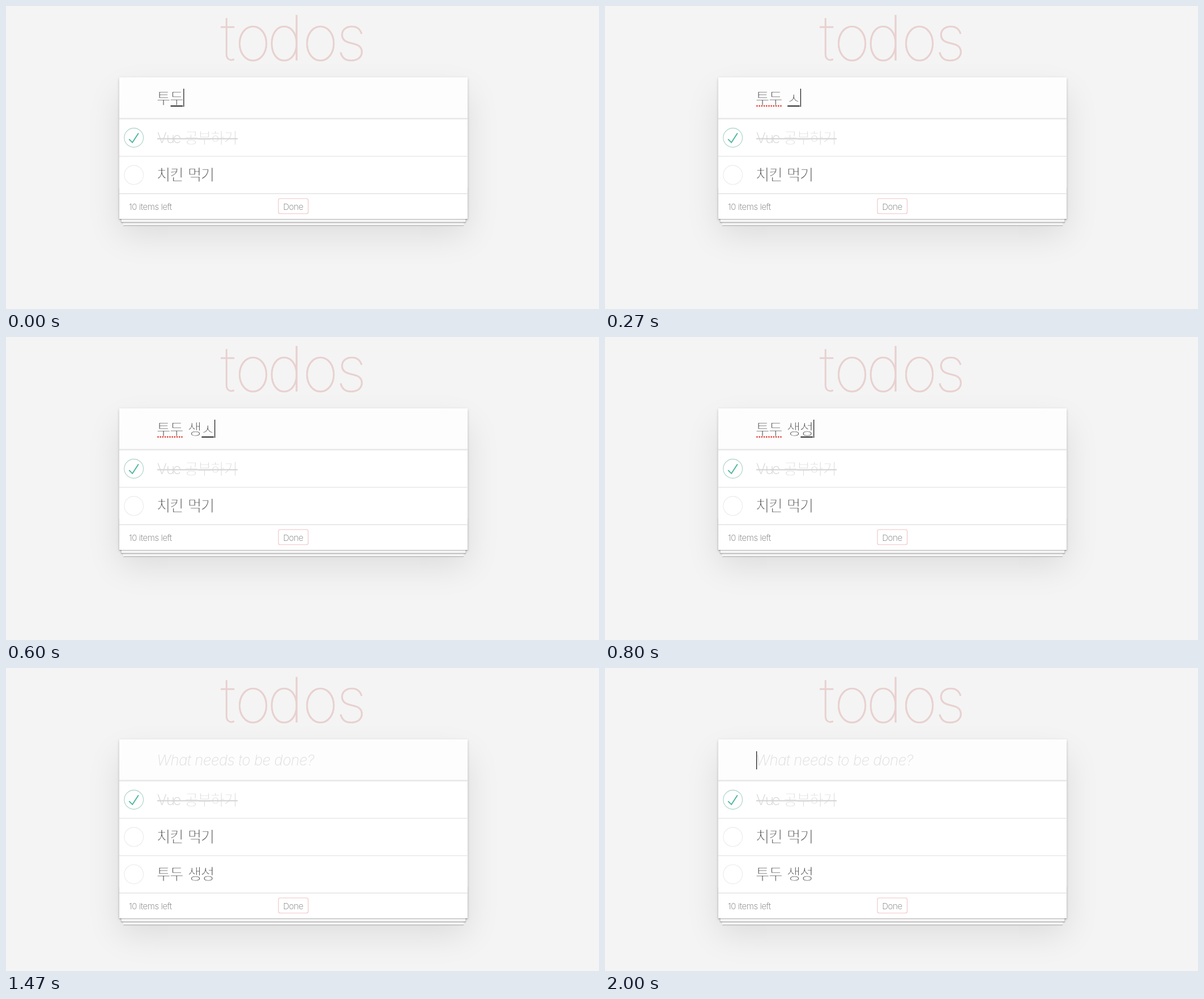
An HTML page for the animation above (2340 ms loop, 1047 px wide and 535 px high).

```html
<!DOCTYPE html>
<html lang="ko">
<head>
<meta charset="utf-8">
<title>todos</title>
<style>
  html, body { margin: 0; width: 100%; height: 100%; overflow: hidden; background: #f4f4f4; }
  #stage { position: absolute; left: 0; top: 0; width: 1047px; height: 535px; overflow: hidden; }
  #card {
    position: absolute; left: 200px; top: 126px; width: 614.5px; background: #fff;
    box-shadow: 0 2.2px 4.5px rgba(0,0,0,.2), 0 28px 56px rgba(0,0,0,.1);
  }
  #stack {
    position: absolute; left: 0; right: 0; bottom: 0; height: 56px;
    box-shadow: 0 1.1px 1.1px rgba(0,0,0,.3),
      0 9px 0 -3.4px #f6f6f6, 0 10.2px 1.1px -3.4px rgba(0,0,0,.32),
      0 18px 0 -6.7px #f6f6f6, 0 19.2px 1.6px -6.7px rgba(0,0,0,.32);
  }
  #entry {
    position: absolute; left: 0; right: 0; top: 0; height: 72.8px;
    background: #fdfdfd; box-shadow: inset 0 -2.2px 1.1px rgba(0,0,0,.03);
  }
  svg { position: absolute; left: 0; top: 0; }
  text { font-family: Inter, "Liberation Sans", sans-serif; stroke-linejoin: round; }
  .title {
    font-size: 110px; font-weight: 100; text-anchor: middle;
    fill: #e8d0cf; stroke: #e8d0cf; stroke-width: .6px;
  }
  .ko {
    font: 100 26.9px "Noto Sans CJK KR", "Noto Sans CJK", "Noto Sans CJK JP", sans-serif;
    fill: #555; text-anchor: middle;
  }
  .vue { font-size: 25.6px; font-weight: 200; text-anchor: middle; }
  .ko.done { fill: #dedede; }
  .vue.done { fill: #d2d2d2; }
  .hint { font-size: 25.8px; font-weight: 200; font-style: italic; letter-spacing: -.45px; fill: #dedede; }
  .foot { font-size: 15.1px; font-weight: 200; letter-spacing: -.4px; fill: #707070; }
  .ring { fill: none; stroke: #ebebeb; stroke-width: 1.1; }
</style>
</head>
<body>
<div id="stage">
  <div id="card"><div id="stack"></div><div id="entry"></div></div>
  <svg width="1047" height="535" viewBox="0 0 1047 535">
    <text class="title" x="392 436 493 555 609.5" y="96">todos</text>

    <rect x="200" y="198.6" width="614.5" height="1.2" fill="#dadada"/>
    <rect x="200" y="264.8" width="614.5" height="1.1" fill="#e2e2e2"/>

    <g id="first">
      <circle class="ring" cx="225.7" cy="232.5" r="16.9" style="stroke:#a9d2c7"/>
      <path transform="translate(208.9 215.7) scale(.336)" fill="#4fb79f"
        d="M72 25L42 71 27 56l-4 4 20 20 34-52z"/>
      <text class="vue done" x="275.5 290.5 302" y="242">Vue</text>
    </g>
    <circle class="ring" cx="225.7" cy="298.3" r="16.9"/>

    <g id="added">
      <rect x="200" y="330.8" width="614.5" height="1.1" fill="#e2e2e2"/>
      <circle class="ring" cx="225.7" cy="364.2" r="16.9"/>
    </g>

    <g id="footer">
      <rect x="200" y="330.8" width="614.5" height="1.1" fill="#dadada"/>
      <text class="foot" x="217" y="360">10 items left</text>
      <rect x="481" y="340" width="52.5" height="26.8" rx="3" fill="none" stroke="#eec4c6" stroke-width="1.1"/>
      <text class="foot" x="507" y="360" text-anchor="middle">Done</text>
    </g>

    <text id="hint" class="hint" x="266.5" y="172">What needs to be done?</text>
    <path id="squiggle" d="M268.5 176.5H311" stroke="#e8483f" stroke-width="2.8" stroke-linecap="round" stroke-dasharray="0 4.2"/>
    <rect id="under" y="175.6" height="2" fill="#222"/>
    <rect id="caret" width="1.3" height="32" fill="#222"/>
  </svg>
</div>
<script>
const LOOP = 2340, LEFT = 267.4, SYLLABLE = 23.2, SPACE = 8.4, ROW = 66;
const $ = id => document.getElementById(id);
const svg = document.querySelector('svg');
const show = (el, on) => el.setAttribute('visibility', on ? 'visible' : 'hidden');
const advance = c => c === ' ' ? SPACE : SYLLABLE;
const width = s => [...s].reduce((w, c) => w + advance(c), 0);

function setKorean(el, s, x) {
  const xs = [...s].map(c => {
    const mid = x + advance(c) / 2 - .8;
    x += advance(c);
    return mid.toFixed(2);
  });
  el.setAttribute('x', xs.join(' '));
  el.textContent = s;
}

function korean(parent, s, x, y, cls = '') {
  const el = document.createElementNS(svg.namespaceURI, 'text');
  el.setAttribute('class', 'ko ' + cls);
  el.setAttribute('y', y);
  setKorean(el, s, x);
  return parent.appendChild(el);
}

const typed = korean(svg, '', LEFT, 172.7);
svg.insertBefore(typed, $('squiggle'));
korean($('first'), '공부하기', 316.5, 242.7, 'done');
$('first').insertAdjacentHTML('beforeend',
  '<rect x="267" y="233.4" width="142" height="2" fill="#d3d3d3"/>');
korean(svg, '치킨 먹기', LEFT, 308.3);
korean($('added'), '투두 생성', LEFT, 374.3);

// Where Korean has no thin cut, shave its strokes with the ground colour.
function ink(weight, family) {
  const ctx = document.createElement('canvas').getContext('2d');
  ctx.font = `${weight} 60px ${family}`;
  ctx.fillText('투', 10, 80);
  return ctx.getImageData(0, 0, 100, 120).data.reduce((a, v) => a + v, 0);
}

const family = getComputedStyle(typed).fontFamily;
if (ink(100, family) > .9 * ink(400, family)) {
  for (const el of document.querySelectorAll('.ko')) {
    el.style.stroke = '#fefefe';
    el.style.strokeWidth = '.04em';
  }
}

// Start time, settled text, syllable being composed
const steps = [
  [0, '투', '두'],
  [200, '투두 ', ''],
  [270, '투두 ', 'ㅅ'],
  [330, '투두 ', '새'],
  [470, '투두 ', '생'],
  [600, '투두 생', 'ㅅ'],
  [670, '투두 생', '서'],
  [800, '투두 생', '성'],
  [1000, '', '']
];

function draw(t) {
  const [, settled, composing] = steps.filter(s => s[0] <= t).pop();
  const text = settled + composing;
  const added = t >= 1000;
  const end = LEFT + width(text);

  setKorean(typed, text, LEFT);
  show($('hint'), !text);
  show($('squiggle'), settled.includes(' '));
  show($('under'), composing);
  $('under').setAttribute('x', LEFT + width(settled));
  $('under').setAttribute('width', Math.max(0, width(composing) - 1.6));

  show($('caret'), t < 1470 || t >= 2000);
  $('caret').setAttribute('x', text ? end - .6 : 267);
  $('caret').setAttribute('y', text ? 146 : 147);

  show($('added'), added);
  $('footer').setAttribute('transform', `translate(0 ${added ? ROW : 0})`);
  $('card').style.height = 250.3 + (added ? ROW : 0) + 'px';
}

const start = performance.now();
function tick() {
  draw((performance.now() - start) % LOOP);
  requestAnimationFrame(tick);
}
draw(0);
requestAnimationFrame(tick);
</script>
</body>
</html>
```
